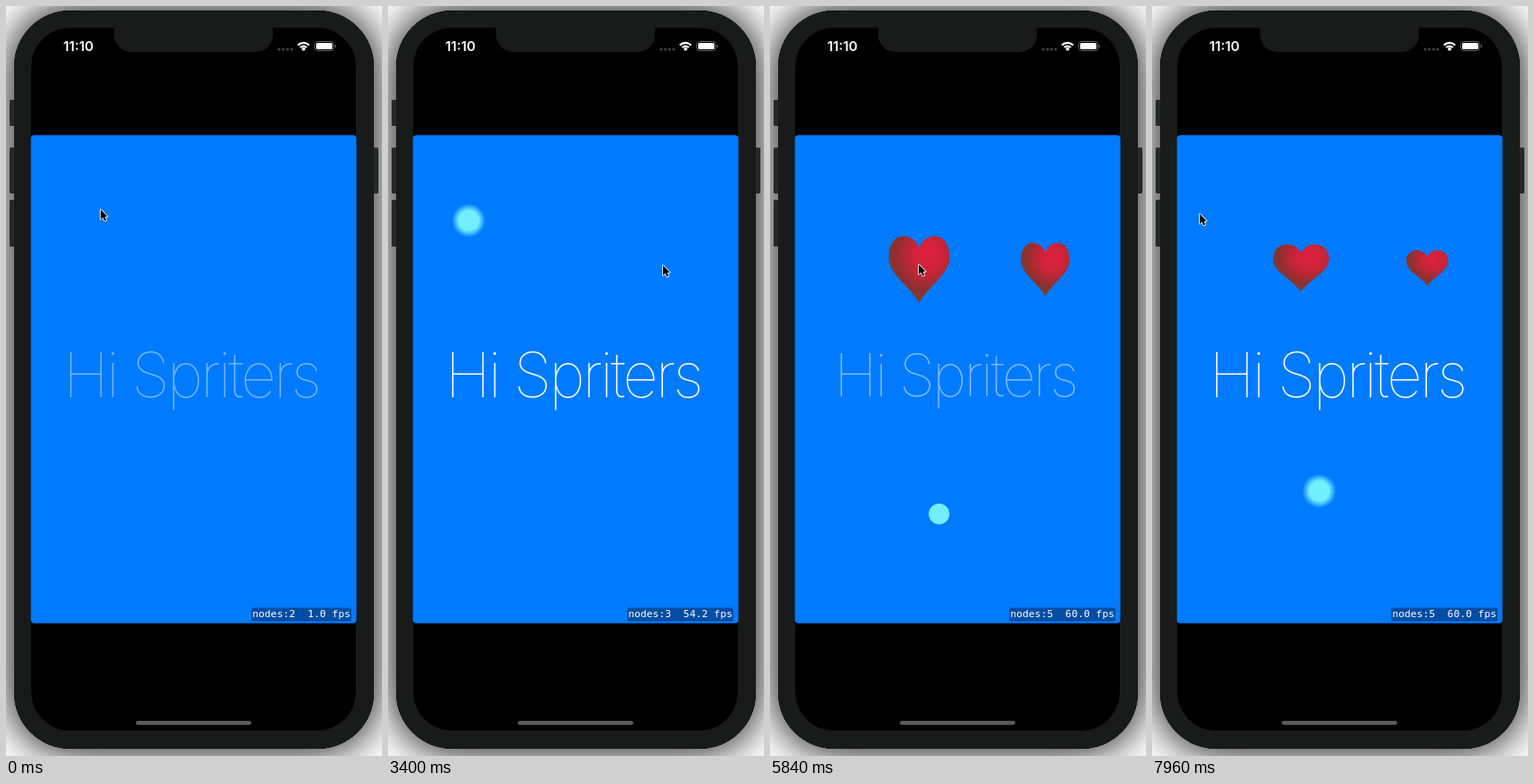
Recreate the animation shown at these times as an HTML page with a canvas. Size 417 px wide and 832 px high, loop 8 s.

```html
<!DOCTYPE html>
<html lang="en">
<head>
<meta charset="utf-8">
<title>Hi Spriters</title>
<style>
  html, body { margin: 0; width: 100%; height: 100%; overflow: hidden; background: #fff; }
  canvas { display: block; }
</style>
</head>
<body>
<canvas id="stage" width="417" height="832"></canvas>
<script>
const ctx = document.getElementById('stage').getContext('2d');
const LOOP = 8000;
const PULSE = 600;
const BODY = '#191a1a';

// The pointer rests at each stop until its tap, then glides to the next.
const STOPS = [[105, 225], [305, 287], [185, 546], [165, 286], [53, 230]];
const TAPS = [2250, 3480, 4640, 5680];
const DOTS = [
  { from: TAPS[0], to: TAPS[2], start: [89.5, 238], end: [112, 225.5] },
  { from: TAPS[2], to: LOOP, start: [187.5, 563.5], end: [185.5, 538] }
];
const HEARTS = [1, 3].map(i => ({ from: TAPS[i], x: STOPS[i][0] + 0.3 }));
const FPS = ['1.0', '60.7', '60.1', '54.2', '57.3', '60.0'];

// Smooth progress from 0 to 1 over a span of time.
function ease(t, begin, duration) {
  const u = Math.min(1, Math.max(0, (t - begin) / duration));
  return u * u * (3 - 2 * u);
}

const mix = (a, b, u) => a.map((v, i) => v + (b[i] - v) * u);

function box(x, y, w, h, radius, color) {
  ctx.fillStyle = color;
  ctx.beginPath();
  ctx.roundRect(x, y, w, h, radius);
  ctx.fill();
}

function disc(x, y, r, color) {
  ctx.fillStyle = color;
  ctx.beginPath();
  ctx.arc(x, y, r, 0, 7);
  ctx.fill();
}

function drawPhone() {
  const drawBody = () => box(9, 5, 399, 819, 62, BODY);
  ctx.fillStyle = '#fff';
  ctx.fillRect(0, 0, 417, 832);
  ctx.save();
  ctx.shadowColor = 'rgba(0,0,0,.6)';
  ctx.shadowBlur = 46;
  drawBody();
  drawBody();
  ctx.restore();

  for (const [x, y, h] of [[4, 104, 29], [4, 157, 51], [4, 215, 52], [407, 157, 51]]) {
    box(x, y, 6, h, 1.5, '#25292b');
  }
  drawBody();
  box(28, 24, 360, 780, 43, '#000');
  box(120, 20, 176, 31, [0, 0, 19, 19], BODY);
  box(144, 793, 128, 4.5, 2.2, '#5b5b5b');
}

function drawStatusBar() {
  ctx.fillStyle = '#fff';
  ctx.font = '600 15px Inter, sans-serif';
  ctx.textAlign = 'left';
  ctx.fillText('11:10', 63.5, 50);

  for (let i = 0; i < 4; i++) disc(303 + i * 4.6, 48, 1.6, '#444');

  ctx.strokeStyle = '#fff';
  ctx.lineWidth = 2.2;
  for (const r of [5, 8.6]) {
    ctx.beginPath();
    ctx.arc(330, 49.5, r, -Math.PI * 0.76, -Math.PI * 0.24);
    ctx.stroke();
  }
  disc(330, 47.7, 1.9, '#fff');

  ctx.strokeStyle = '#666';
  ctx.lineWidth = 1;
  ctx.beginPath();
  ctx.roundRect(342.5, 39.5, 21, 10, 3);
  ctx.stroke();
  box(344, 41, 18, 7, 1.5, '#fff');
  box(364.8, 43, 1.2, 3, 0.6, '#666');
}

function drawTitle(t) {
  const tap = TAPS.find(s => t >= s && t < s + PULSE);
  const dip = tap === undefined ? 0 : 1 - Math.abs(1 - 2 * (t - tap) / PULSE);
  ctx.save();
  ctx.globalAlpha = Math.min(1, 0.45 + t / 1800) * (1 - 0.9 * dip);
  ctx.translate(207.5, 409);
  ctx.scale(1 - 0.1 * dip, 1 - 0.1 * dip);
  ctx.fillStyle = '#fff';
  ctx.font = '100 69px Inter, Roboto, sans-serif';
  ctx.letterSpacing = '-3px';
  ctx.textAlign = 'center';
  ctx.fillText('Hi Spriters', -2.3, 25);
  ctx.restore();
}

function drawDot(dot, t) {
  const [x, y] = mix(dot.start, dot.end, ease(t, dot.from + 1200, 1000));
  const radius = 15.5 - 3.5 * Math.cos((t - 5840) / 685);
  const glow = ctx.createRadialGradient(x, y, 11, x, y, radius);
  glow.addColorStop(0, 'rgb(115,238,255)');
  glow.addColorStop(1, 'rgba(115,238,255,0)');
  disc(x, y, radius, glow);
}

// Hearts shrink steadily with age; all of them flatten together near the end.
function drawHeart(heart, t) {
  const size = 72 - 0.0065 * (t - heart.from);
  const squash = ease(t, 6850, 1110);
  const stretch = Math.sqrt(1.1 - 0.255 * squash);
  ctx.save();
  ctx.translate(heart.x, 292.5 - 1.8 * squash);
  ctx.scale(size / stretch, size * stretch);
  const shade = ctx.createRadialGradient(0.14, -0.22, 0, 0.14, -0.22, 0.72);
  shade.addColorStop(0, '#e2203f');
  shade.addColorStop(0.35, '#cc2438');
  shade.addColorStop(0.75, '#8c302f');
  shade.addColorStop(1, '#70443a');
  ctx.fillStyle = shade;
  ctx.beginPath();
  for (const s of [-1, 1]) {
    ctx.moveTo(0, -0.32);
    ctx.bezierCurveTo(s * 0.05, -0.44, s * 0.14, -0.5, s * 0.25, -0.5);
    ctx.bezierCurveTo(s * 0.4, -0.5, s * 0.5, -0.38, s * 0.5, -0.19);
    ctx.bezierCurveTo(s * 0.5, 0.08, s * 0.19, 0.2, 0, 0.5);
  }
  ctx.fill();
  ctx.restore();
}

function drawStats(t) {
  const shown = [...DOTS.filter(d => t >= d.from && t < d.to), ...HEARTS.filter(h => t >= h.from)];
  const fps = FPS[Math.min(FPS.length - 1, Math.floor((t + 500) / 1250))];
  const text = `nodes:${2 + shown.length}  ${fps} fps`;
  ctx.font = '11.3px "DejaVu Sans Mono", monospace';
  ctx.textAlign = 'right';
  const width = ctx.measureText(text).width;
  box(381 - width, 667.5, width + 2, 15, 2, 'rgba(0,0,0,.36)');
  ctx.fillStyle = '#fff';
  ctx.fillText(text, 382, 678);
}

function drawCursor(t) {
  const [x, y] = TAPS.reduce((p, tap, i) => mix(p, STOPS[i + 1], ease(t, tap + 300, 700)), STOPS[0]);
  const outline = [[0, 0], [0, 13], [3, 10.3], [5.2, 15], [7.4, 14], [5.3, 9.5], [9, 9.3]];
  ctx.save();
  ctx.translate(x, y + 0.8);
  ctx.scale(0.84, 0.84);
  ctx.beginPath();
  for (const point of outline) ctx.lineTo(...point);
  ctx.closePath();
  ctx.lineJoin = 'round';
  ctx.strokeStyle = '#fff';
  ctx.lineWidth = 1.9;
  ctx.stroke();
  ctx.fillStyle = '#000';
  ctx.fill();
  ctx.restore();
}

function draw(t) {
  drawPhone();
  drawStatusBar();
  box(27.6, 143.25, 361, 541.5, 4, '#007aff');
  drawTitle(t);
  for (const dot of DOTS) if (t >= dot.from && t < dot.to) drawDot(dot, t);
  for (const heart of HEARTS) if (t >= heart.from) drawHeart(heart, t);
  drawStats(t);
  drawCursor(t);
}

const start = performance.now();
function tick() {
  draw((performance.now() - start) % LOOP);
  requestAnimationFrame(tick);
}
tick();
</script>
</body>
</html>
```
